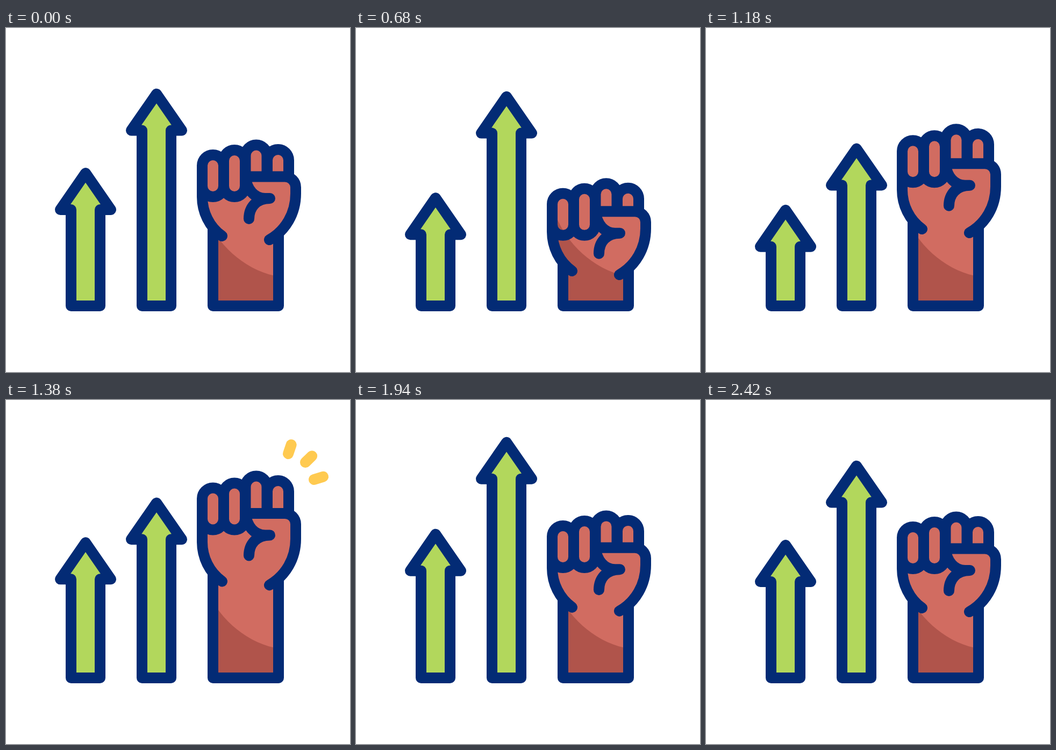
These frames come from a looping animation (640x640 px, 3 s). An HTML page:

```html
<!DOCTYPE html>
<html lang="en">
<head>
<meta charset="utf-8">
<title>Rising arrows and fist</title>
<style>
html, body { margin: 0; width: 100%; height: 100%; overflow: hidden; background: #fff; }
svg { display: block; width: 100vw; height: 100vh; }
.line { fill: none; stroke: #032b75; stroke-width: 20; stroke-linecap: round; stroke-linejoin: round; }
.green { fill: #b2d75c; }
.skin { fill: #d16c61; }
.shade { fill: #b0544b; }
.spark { fill: none; stroke: #ffca50; stroke-width: 20; stroke-linecap: round; }
</style>
</head>
<body>
<svg viewBox="0 0 640 640">
  <clipPath id="skinClip"><path id="clipBody"/><path id="clipFingers"/></clipPath>
  <path id="short" class="line green" style="fill:#b2d75c"/>
  <path id="tall" class="line green" style="fill:#b2d75c"/>
  <path id="body" class="skin"/>
  <path id="fingers" class="skin"/>
  <path class="shade" clip-path="url(#skinClip)" d="M372 350C392 400 440 448 500 461L520 464V530H340V350Z"/>
  <path id="outline" class="line"/>
  <path id="sparks" class="spark"/>
</svg>
<script>
const LOOP = 3000, STEP = 600, FLOOR = 517;
const $ = id => document.getElementById(id);
const draw = (id, d) => $(id).setAttribute('d', d);
const clamp = x => Math.min(1, Math.max(0, x));
const smooth = x => { x = clamp(x); return x * x * (3 - 2 * x); };
const mix = (a, b, k) => a + (b - a) * k;

// Rest, down, up and back to rest, one step each.
function bounce(t, start, down, up) {
  const part = n => smooth((t - start) / STEP - n);
  return down * part(0) - (down + up) * part(1) + up * part(2);
}

function arrow(cx, tip, head) {
  const y = tip + head;
  return `M${cx - 27} ${y}H${cx - 47}L${cx} ${tip}L${cx + 47} ${y}H${cx + 27}V${FLOOR}H${cx - 27}Z`;
}

function capsule(cx, top, bottom) {
  return `M${cx - 20} ${bottom}V${top}a20 20 0 0 1 40 0V${bottom}a20 20 0 0 1 -40 0Z`;
}

function dome(cx, top, bottom) {
  return `M${cx - 20} ${bottom}V${top}a20 20 0 0 1 40 0V${bottom}`;
}

function drawFist(t) {
  const move = (down, up) => bounce(t, 200, down, up);
  const near = move(80, 73);
  const far = move(80, 76.5);
  const palm = move(72, 66);
  const wrist = move(72.5, 50);
  const bar = 276.5 + palm;
  const w = y => y + wrist;

  const fingers = capsule(385, 256 + near, 294 + near) + capsule(425, 247 + near, 294 + near) +
    dome(465.5, 237.5 + far, bar) + dome(506, 246 + far, bar);
  const left = `365 ${294 + near}V${w(314)}C365 ${w(342)} 378 ${w(370)} 402 ${w(387)}`;
  const right = `490 ${w(394)}C520 ${w(377)} 539 ${w(345)} 539 ${w(308)}V${bar + 20}a20 20 0 0 0 -20 -20H445.5`;
  const arm = `M385 ${w(373)}V${FLOOR}H507V${w(382)}`;
  const thumb = `M445.5 ${bar}c2.5 24 16.5 40.5 36.5 40.5H491C465 ${bar + 40.5} 452 ${bar + 58} 452 ${bar + 78.5}`;
  const body = `M${left}L385 ${w(387)}V${FLOOR}H507V${w(382)}L${right}Z`;

  draw('body', body);
  draw('clipBody', body);
  draw('fingers', fingers);
  draw('clipFingers', fingers);
  draw('outline', fingers + `M${left}M${right}` + arm + thumb);
  drawSparks(t, far);
}

const rays = [[525, 176, 532, 155.5], [557, 192, 572, 177.5], [573, 224, 594, 217.5]];

function drawSparks(t, dy) {
  const shown = t >= 1190 && t < 1680;
  const head = clamp((t - 1190) / 235);
  const tail = Math.min(clamp((t - 1420) / 235), 0.999);
  draw('sparks', shown ? rays.map(([x1, y1, x2, y2]) => {
    const at = k => `${mix(x1, x2, k)} ${mix(y1, y2, k) + dy}`;
    return `M${at(tail)}L${at(head)}`;
  }).join('') : '');
}

function render(t) {
  draw('short', arrow(148, 270 + bounce(t, 400, 102.2, 51), 68));
  draw('tall', arrow(280, 122.7 + bounce(t, 600, 102.2, 51), 67.8));
  drawFist(t);
}

function tick() {
  render(performance.now() % LOOP);
  requestAnimationFrame(tick);
}
tick();
</script>
</body>
</html>
```
